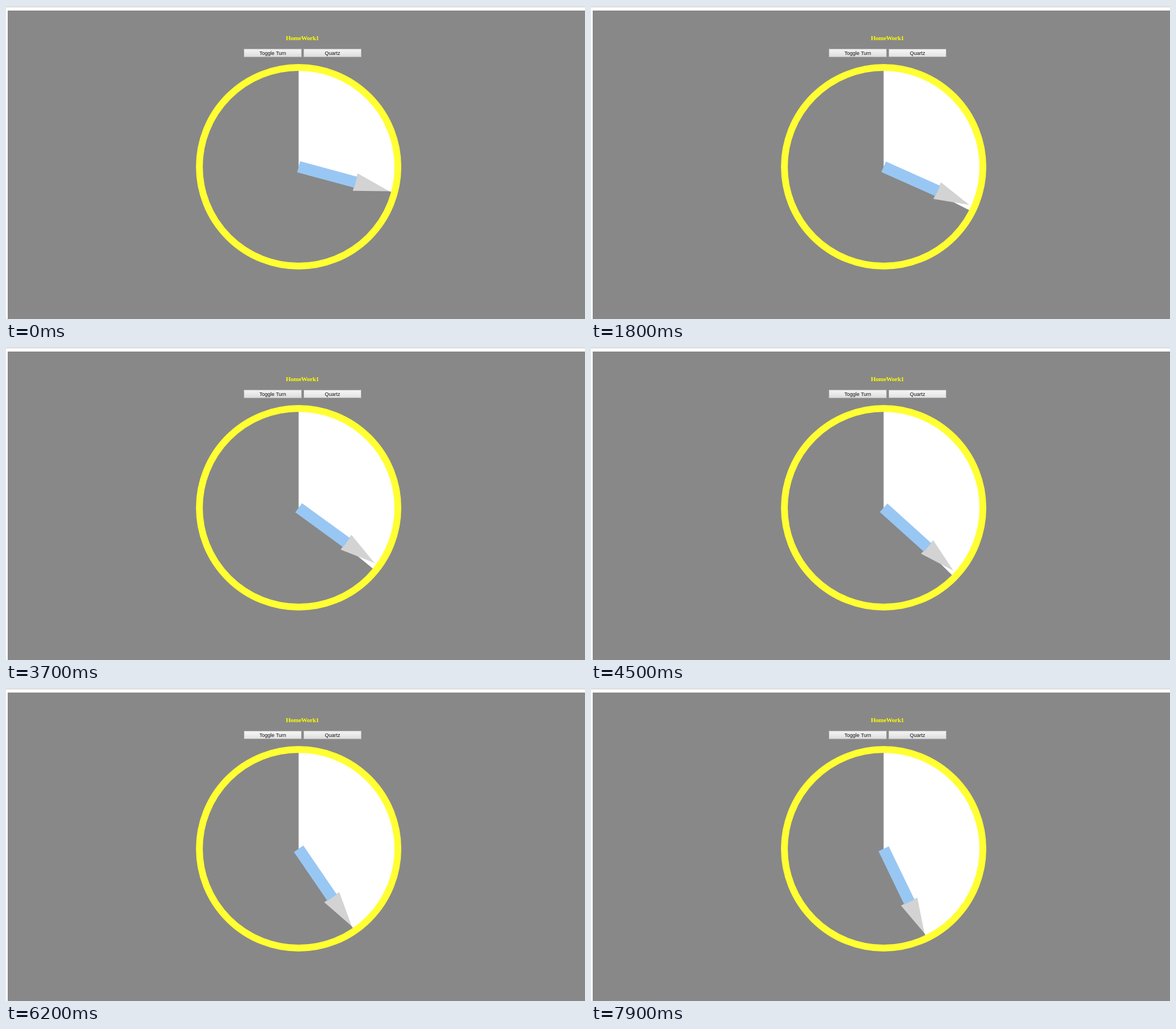
Animation, 1018 px wide and 550 px high, one loop 8000 ms. Source, as an HTML page with a canvas:

```html
<!DOCTYPE html>
<html lang="en">
<head>
<meta charset="utf-8">
<title>Clock</title>
<style>
  html, body { margin: 0; width: 100%; height: 100%; overflow: hidden; background: #fff; }
  canvas { display: block; }
</style>
</head>
<body>
<canvas id="stage" width="1018" height="550"></canvas>
<script>
const ctx = document.getElementById('stage').getContext('2d');
const LOOP = 8000, STEP = 100;
const CX = 514.5, CY = 282.5, INNER = 168.5, RING = 12;
const RAD = Math.PI / 180;

// [time in ms, angle in degrees]; the flat part is the paused clock
const SWEEP = [[0, 15.1], [5500, 51.1], [6800, 59.4], [7100, 59.4], [7900, 64.2]];

const within = (t, from, to) => t >= from && t < to;

function sweepAt(t) {
  for (let i = 1; i < SWEEP.length; i++) {
    const [t0, a0] = SWEEP[i - 1], [t1, a1] = SWEEP[i];
    if (t <= t1) return a0 + (a1 - a0) * (t - t0) / (t1 - t0);
  }
  return SWEEP[SWEEP.length - 1][1];
}

function rect(color, x, y, w, h) {
  ctx.fillStyle = color;
  ctx.fillRect(x, y, w, h);
}

function label(text, x, y, font, color, spacing) {
  ctx.font = font;
  ctx.fillStyle = color;
  ctx.textAlign = 'center';
  ctx.letterSpacing = spacing || '0px';
  ctx.fillText(text, x, y);
}

function button(text, x, hover) {
  const y = 75, w = 102, h = 15;
  const face = ctx.createLinearGradient(0, y, 0, y + h);
  face.addColorStop(0, hover ? '#f3f3f3' : '#f0f0f0');
  face.addColorStop(0.38, hover ? '#f0f0f0' : '#ededed');
  face.addColorStop(1, hover ? '#e0e0e0' : '#dadada');
  rect(hover ? '#a0a0a0' : '#b2b2b2', x, y, w, h);
  rect(face, x + 1, y + 1, w - 2, h - 2);
  label(text, x + w / 2, 86, '9px "Liberation Sans", Arial, sans-serif', '#111');
}

function wedge(angle) {
  ctx.fillStyle = '#fff';
  ctx.beginPath();
  ctx.moveTo(CX, CY);
  ctx.arc(CX, CY, INNER + 2, -Math.PI / 2, angle * RAD);
  ctx.fill();
}

function hand(angle) {
  ctx.save();
  ctx.translate(CX, CY);
  ctx.rotate(angle * RAD);
  ctx.fillStyle = '#d3d3d3';
  ctx.beginPath();
  ctx.moveTo(103, -16);
  ctx.lineTo(165, 0);
  ctx.lineTo(103, 16);
  ctx.fill();
  rect('#99c7f3', 0, -10, 104, 20);
  ctx.restore();
}

function ring() {
  ctx.strokeStyle = '#ffff33';
  ctx.lineWidth = RING;
  ctx.beginPath();
  ctx.arc(CX, CY, INNER + RING / 2, 0, 2 * Math.PI);
  ctx.stroke();
}

function draw(t) {
  const angle = sweepAt(t);
  const ticking = within(t, 1000, 4800);

  rect('#fff', 0, 0, 1018, 550);
  rect('#b8b8b8', 0, 1, 1018, 1);
  rect('#888', 3, 8, 1015, 542);
  label('HomeWork1', 521, 59.5, 'bold 11px "Liberation Serif", Times, serif', '#ff0', '-0.3px');
  button('Toggle Turn', 418, within(t, 5100, 7600));
  button('Quartz', 523, within(t, 500, 5000));
  wedge(angle);
  ring();
  hand(ticking ? Math.floor(angle / 6) * 6 : angle);
}

const start = performance.now();
function frame() {
  const t = (performance.now() - start) % LOOP;
  draw(Math.floor(t / STEP) * STEP);
  requestAnimationFrame(frame);
}
frame();
</script>
</body>
</html>
```
